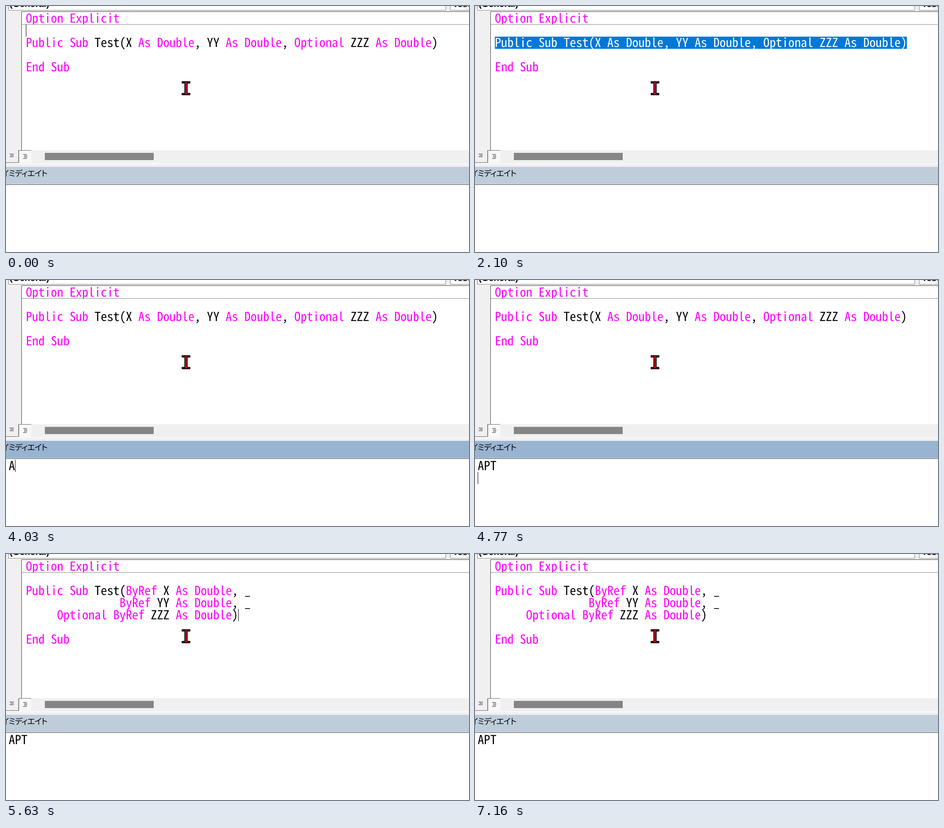
Animation of 1025x546 px, one loop 7.23 s. Source, as an HTML page:

```html
<!DOCTYPE html>
<html lang="ja">
<head>
<meta charset="utf-8">
<style>
  html, body { margin: 0; width: 100%; height: 100%; overflow: hidden; background: #fff; }
  svg { display: block; }
  text { white-space: pre; text-rendering: geometricPrecision; }
  .code {
    font: 27.64px "Noto Sans Mono CJK JP", "Noto Sans Mono", monospace;
    font-size-adjust: ch-width 0.5;
  }
  .key { fill: #f0f; }
  .selected, .selected .key { fill: #fff; }
  .ui { font: bold 20px "Liberation Sans", sans-serif; }
  .title {
    font: 18px "Noto Sans CJK JP", sans-serif;
    font-feature-settings: "palt"; letter-spacing: -1px; text-anchor: end;
  }
</style>
</head>
<body>
<svg width="1025" height="546" viewBox="0 0 1025 546">
  <rect width="1025" height="546" fill="#fff"/>
  <!-- combo boxes -->
  <path d="M0 0H1025V12H0Z" fill="#f0f0f0"/>
  <path d="M5.5 -2V9.5H973.5V-2M983.5 -2V9.5H1027" fill="#fff" stroke="#848484"/>
  <text class="ui" x="8" y="2">(General)</text>
  <text class="ui" x="989" y="2">Test</text>

  <!-- code pane -->
  <text class="code key" x="44" y="37">Option Explicit</text>
  <rect x="35" y="41" width="990" height="279" fill="#fff"/>
  <rect y="12" width="34" height="308" fill="#f0f0f0"/>
  <path d="M34.5 320V12.5H1025" fill="none" stroke="#404040"/>
  <path d="M35 41H1025" stroke="#808080"/>
  <rect id="selection" x="44" y="68" width="912" height="27" fill="#0078d7"/>
  <g id="code"></g>

  <!-- view buttons and scroll bar -->
  <rect y="320" width="1025" height="37" fill="#f0f0f0"/>
  <rect y="349" width="1025" height="2" fill="#fafafa"/>
  <rect x="29" y="321" width="27" height="27" fill="#f8f8f8"/>
  <path d="M0 347.5H28M28.5 348V320.5H56" fill="none" stroke="#696969"/>
  <path d="M27.5 320V348" stroke="#a0a0a0"/>
  <path d="M8 328.5H17M10 331.5H17M8 334.5H17M38 329.5H46M40 332.5H47M40 335.5H47M38 338.5H46" stroke="#222"/>
  <rect x="86" y="326" width="241" height="16" fill="#858585"/>

  <!-- immediate window -->
  <rect id="bar" y="357" width="1025" height="38" fill="#bfcddb"/>
  <rect y="395" width="1025" height="1" fill="#d8d8d8"/>
  <path d="M0 396.5H1025" stroke="#505050"/>
  <text class="title" x="91" y="378">イミディエイト</text>
  <text id="typed" class="code" x="6" y="422"></text>

  <rect id="caret" width="1" height="27"/>
  <path d="M389 167H408V172H402V193H408V198H389V193H395V172H389Z"/>
  <path id="pointer" d="M391 169H406V170H400V195H406V196H391V195H397V170H391Z"/>
</svg>
<script>
const LOOP = 7230, ROW = 27;
const $ = id => document.getElementById(id);

// Each entry: start time, then caret x and y; no position means hidden.
const carets = [
  [0, 44, 41], [130], [650, 44, 41], [980, 141, 68], [1570, 44, 41], [1700, 44, 68],
  [2100], [3160, 6, 399], [3700], [3980, 20, 399], [4180, 34, 399], [4290, 47, 399],
  [4770, 6, 426], [4900], [5630, 514, 122], [6170], [6630, 514, 122], [7160]
];
const keystrokes = [3980, 4180, 4290];

const oneLine = [
  'Public Sub Test(X As Double, YY As Double, Optional ZZZ As Double)', '', 'End Sub'
];
const wrapped = [
  'Public Sub Test(ByRef X As Double, _',
  ' '.repeat(15) + 'ByRef YY As Double, _',
  ' '.repeat(5) + 'Optional ByRef ZZZ As Double)', '', 'End Sub'
];

const highlight = line =>
  line.replace(/\b(Public|Sub|As|Double|Optional|ByRef|End)\b/g, '<tspan class="key">$1</tspan>');

function showCode(lines, selected) {
  $('code').innerHTML = lines.map((line, i) =>
    `<text class="code ${selected && i === 0 ? 'selected' : ''}" x="44" y="${91 + i * ROW}">${highlight(line)}</text>`
  ).join('');
}

let shown;
function draw(t) {
  const selected = (t >= 2100 && t < 3160) || (t >= 4900 && t < 5630);
  const lines = t < 5630 ? oneLine : wrapped;
  const state = `${selected} ${lines.length}`;
  if (state !== shown) showCode(lines, selected);
  shown = state;

  $('selection').setAttribute('visibility', selected ? 'visible' : 'hidden');
  $('bar').setAttribute('fill', t >= 3160 && t < 4900 ? '#99b4d1' : '#bfcddb');
  $('pointer').setAttribute('fill', t < 4030 ? '#dc143c' : '#e81010');
  $('typed').textContent = 'APT'.slice(0, keystrokes.filter(k => t >= k).length);

  const [, x = -9, y = 0] = carets.findLast(c => t >= c[0]);
  $('caret').setAttribute('x', x);
  $('caret').setAttribute('y', y);
}

const start = performance.now();
function tick() {
  draw((performance.now() - start) % LOOP);
  requestAnimationFrame(tick);
}
tick();
</script>
</body>
</html>
```
